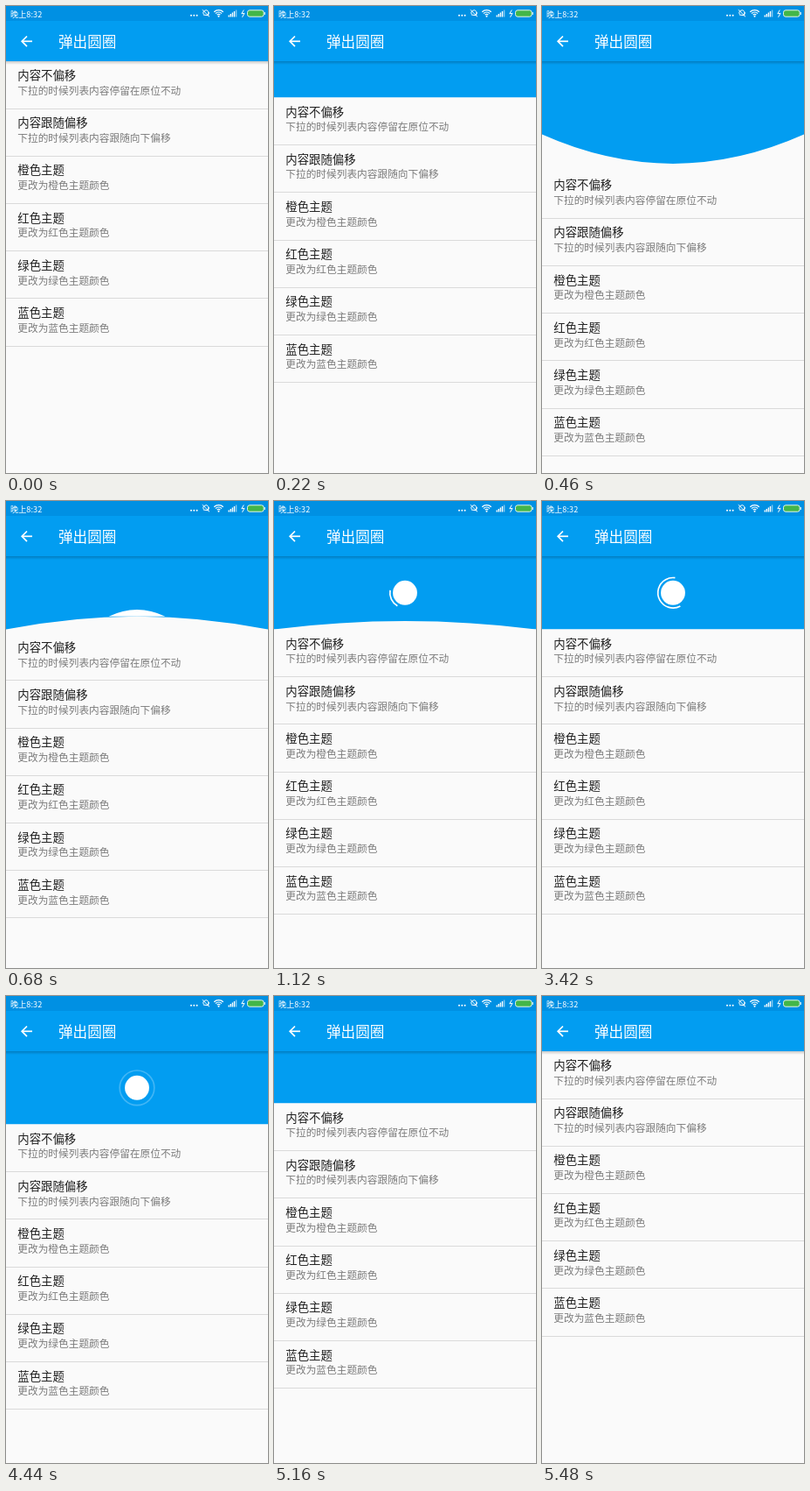
An HTML page with a canvas that plays this animation: 300 px wide and 533 px high, repeating every 5.5 s.

```html
<!DOCTYPE html>
<html lang="zh-CN">
<head>
<meta charset="utf-8">
<style>
html, body { margin: 0; width: 100%; height: 100%; overflow: hidden; background: #fafafa; }
canvas { display: block; width: 100vw; height: 100vh; }
</style>
</head>
<body>
<canvas id="stage" width="300" height="533"></canvas>
<script>
const ctx = document.getElementById('stage').getContext('2d');
const W = 300, TALL = 533, LOOP = 5500, MID = W / 2;
const BLUE = '#029df1', DARK = '#0090e3', FONT = '"Noto Sans CJK SC", "Noto Sans CJK", Roboto, sans-serif';
const BAR = 63, HEAD = 83.6, PEAK = HEAD * 1.5, R = HEAD / 6, STROKE = 1.67;

// Timeline in ms
const PULL = 165, RELEASE = 472, FINISH = 4132, COLLAPSE = 5113;
const SLIDE = 307, SPRING = 1227, FINISH_TIME = 981, STEP = 20.45;

const WAVE = (PEAK - HEAD) * 0.8, BOUNCE = WAVE * 0.8;
const KEYS = [WAVE, 0, -BOUNCE, 0, -BOUNCE * 0.4, 0];
const springAt = p => RELEASE + SPRING * (1 - Math.sqrt(1 - p));
const BALL_START = springAt(0.4), RING_START = springAt(0.6);

const ROWS = [
  ['内容不偏移', '下拉的时候列表内容停留在原位不动'],
  ['内容跟随偏移', '下拉的时候列表内容跟随向下偏移'],
  ...['橙色', '红色', '绿色', '蓝色'].map(c => [c + '主题', `更改为${c}主题颜色`])
];

const clamp = x => Math.max(0, Math.min(1, x));
const slide = (t, start) => 1 - (1 - clamp((t - start) / SLIDE)) ** 2;

function text(s, x, y, size, color) {
  ctx.font = `${size}px ${FONT}`;
  ctx.fillStyle = color;
  ctx.fillText(s, x, y);
}

function line(points, width, color = '#fff') {
  ctx.beginPath();
  points.forEach(([x, y]) => ctx.lineTo(x, y));
  ctx.lineWidth = width;
  ctx.strokeStyle = color;
  ctx.stroke();
}

function disc(x, y, r) {
  ctx.beginPath();
  ctx.arc(x, y, r, 0, 7);
  ctx.fill();
}

function arc(x, y, r, from, to, width = STROKE) {
  ctx.beginPath();
  ctx.arc(x, y, r, from * Math.PI / 180, to * Math.PI / 180);
  ctx.lineWidth = width;
  ctx.strokeStyle = '#fff';
  ctx.stroke();
}

function offsetAt(t) {
  if (t < RELEASE) return PEAK * slide(t, PULL);
  if (t < COLLAPSE) return PEAK + (HEAD - PEAK) * slide(t, RELEASE);
  return HEAD * (1 - slide(t, COLLAPSE));
}

function waveAt(t, offset) {
  if (t < RELEASE) return Math.max(offset - HEAD, 0) * 0.8;
  const p = 5 * (1 - (1 - clamp((t - RELEASE) / SPRING)) ** 2);
  const i = Math.min(4, Math.floor(p));
  return KEYS[i] + (KEYS[i + 1] - KEYS[i]) * (p - i);
}

function hump(left, y, rise) {
  ctx.beginPath();
  ctx.moveTo(left, y);
  ctx.quadraticCurveTo(MID, y - rise, W - left, y);
  ctx.fill();
}

function tail(y, bottom, f) {
  const sx = MID + R * Math.sqrt(1 - f * f / 4), sy = y + R * f / 2;
  const near = MID + R * 0.75 * (1 - f), far = near + R;
  ctx.beginPath();
  ctx.moveTo(sx, sy);
  ctx.quadraticCurveTo(near, bottom, far, bottom);
  ctx.lineTo(W - far, bottom);
  ctx.quadraticCurveTo(W - near, bottom, W - sx, sy);
  ctx.fill();
}

function ring(t) {
  let start = 90, stop = 90, growing = true;
  for (let n = Math.floor((t - RING_START) / STEP); n >= 0; n--) {
    start += growing ? 3 : 10;
    stop += growing ? 10 : 3;
    if (stop - start >= 270) growing = false;
    else if (stop - start <= 10) growing = true;
  }
  arc(MID, HEAD / 2, R + STROKE * 2, start, stop);
}

function springUp(t, wave) {
  if (t < springAt(0.2)) return;
  if (t < BALL_START) {
    const ratio = -wave / BOUNCE, y = HEAD + wave;
    if (ratio < 0.9) hump(MID - 4 * R + 3 * R * ratio, y, 2 * R * ratio);
    else disc(MID, y, R);
    return;
  }
  const y = Math.max(HEAD / 2, HEAD - BOUNCE - (t - BALL_START) * 0.17);
  disc(MID, y, R);
  if (t < RING_START) tail(y, HEAD + wave, (HEAD + wave) / HEAD);
  else ring(t);
}

function dropDown(t) {
  const p = (1 - Math.cos(Math.PI * clamp((t - FINISH) / FINISH_TIME))) / 2;
  if (p < 0.3) {
    const f = p / 0.3;
    disc(MID, HEAD / 2, R);
    ctx.globalAlpha = 1 - f;
    arc(MID, HEAD / 2, R + STROKE * 2 * (1 + f), 0, 360);
    ctx.globalAlpha = 1;
  } else if (p < 0.7) {
    const f = (p - 0.3) / 0.4, y = HEAD / 2 * (1 + f);
    disc(MID, y, R);
    if (y >= HEAD - R * 2) tail(y, HEAD, f);
  } else {
    const f = (p - 0.7) / 0.3;
    if (f < 1) hump(MID - R - 2 * R * f, HEAD, R * (1 - f));
  }
}

function header(t, offset) {
  const wave = waveAt(t, offset), base = Math.min(HEAD, offset);
  ctx.save();
  ctx.translate(0, BAR);
  ctx.beginPath();
  ctx.rect(0, 0, W, offset);
  ctx.clip();
  ctx.fillStyle = BLUE;
  ctx.beginPath();
  ctx.moveTo(0, 0);
  ctx.lineTo(W, 0);
  ctx.lineTo(W, base);
  ctx.quadraticCurveTo(MID, base + wave * 2, 0, base);
  ctx.fill();
  ctx.fillStyle = '#fff';
  if (t >= FINISH) dropDown(t);
  else if (t >= RELEASE) springUp(t, wave);
  ctx.restore();
}

function list(offset) {
  ROWS.forEach(([title, note], i) => {
    const y = BAR + offset + i * 54.2;
    text(title, 13.3, y + 21, 13.4, '#212121');
    text(note, 13.3, y + 37.7, 11.7, '#7b7b7b');
    ctx.fillStyle = '#dadada';
    ctx.fillRect(0, Math.round(y + 53.6), W, 1);
  });
}

function statusIcons() {
  ctx.fillStyle = '#fff';
  [212, 215.3, 218.6].forEach(x => disc(x, 10.8, 1));
  // Muted bell
  arc(229, 8, 3.2, 150, 400, 1);
  line([[226, 10], [231.5, 10.8], [232, 7]], 1);
  line([[224.8, 4.2], [233, 12.3]], 1);
  // Wi-Fi
  [2.6, 5, 7.4].forEach(r => arc(243.5, 12, r, 225, 315, 1.2));
  disc(243.5, 11.8, 1);
  // Signal bars
  for (let i = 0; i < 5; i++) {
    ctx.globalAlpha = i < 4 ? 1 : 0.5;
    ctx.fillRect(254.5 + i * 2.1, 10.5 - i * 1.5, 1.4, 2 + i * 1.5);
  }
  ctx.globalAlpha = 1;
  line([[272.3, 4.5], [269.8, 8.8], [273, 8.3], [270.5, 12.8]], 1);
  // Battery
  ctx.beginPath();
  ctx.roundRect(276.5, 4.8, 18.6, 7.4, 2.5);
  ctx.fillStyle = '#43b649';
  ctx.fill();
  ctx.lineWidth = 1;
  ctx.strokeStyle = '#e2f4ee';
  ctx.stroke();
  ctx.fillStyle = '#e2f4ee';
  ctx.fillRect(295.5, 7, 1.3, 3);
}

function appBar() {
  const shade = ctx.createLinearGradient(0, BAR, 0, BAR + 4);
  shade.addColorStop(0, 'rgba(0,0,0,.2)');
  shade.addColorStop(1, 'rgba(0,0,0,0)');
  ctx.fillStyle = shade;
  ctx.fillRect(0, BAR, W, 4);
  ctx.fillStyle = BLUE;
  ctx.fillRect(0, 0, W, BAR);
  ctx.fillStyle = DARK;
  ctx.fillRect(0, 0, W, 17);
  text('晚上8:32', 5, 12.5, 9.2, '#fff');
  text('弹出圆圈', 60, 46.8, 16.6, '#fff');
  line([[30, 40.3], [18.5, 40.3]], 1.7);
  line([[24, 34.5], [18.2, 40.3], [24, 46.1]], 1.7);
  statusIcons();
}

function draw(now) {
  const t = now % LOOP, offset = offsetAt(t);
  ctx.fillStyle = '#fafafa';
  ctx.fillRect(0, 0, W, TALL);
  header(t, offset);
  list(offset);
  appBar();
  requestAnimationFrame(() => draw(performance.now() - began));
}

const began = performance.now();
draw(0);
</script>
</body>
</html>
```
